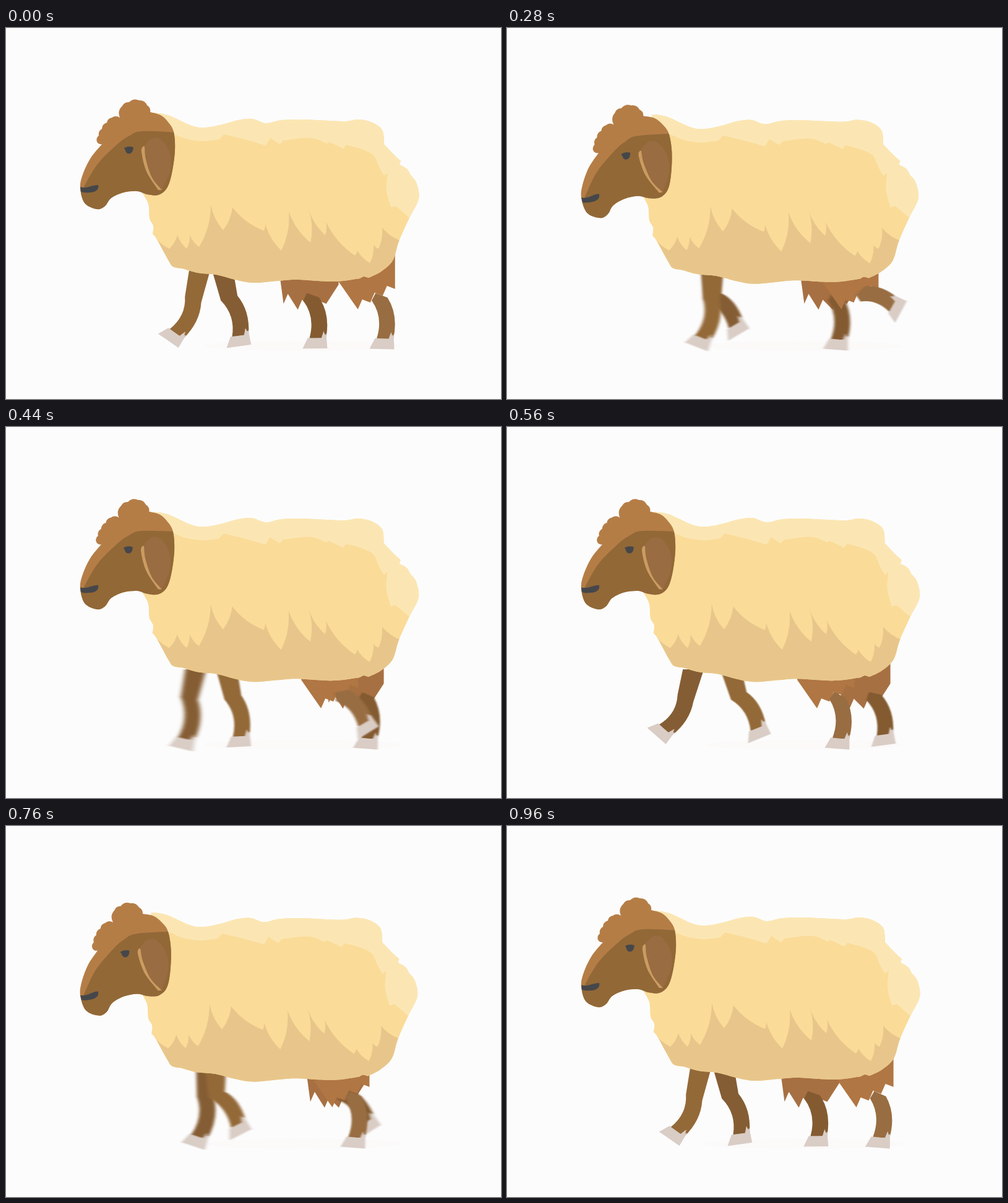
An HTML page that plays this animation: 800x600 px, repeating every 1000 ms.

```html
<!DOCTYPE html>
<html lang="en">
<head>
<meta charset="utf-8">
<title>Walking sheep</title>
<style>
  html, body { margin: 0; width: 100%; height: 100%; overflow: hidden; background: #fcfcfc; }
  svg { display: block; width: 100vw; height: 100vh; }
</style>
</head>
<body>
<svg viewBox="0 0 800 600">
  <defs id="defs">
    <path id="wool"/>
    <path id="skull"/>
    <clipPath id="inWool"><use href="#wool"/></clipPath>
    <clipPath id="inSkull"><use href="#skull"/></clipPath>
  </defs>
  <ellipse cx="480" cy="514" rx="160" ry="8" fill="#fcf9f9"/>
  <g id="legs"></g>
  <g id="body">
    <use href="#wool" fill="#fadb98"/>
    <g clip-path="url(#inWool)">
      <path id="shine" fill="#fbe6b3"/>
      <path id="shade" fill="#e8c68b"/>
    </g>
  </g>
  <g id="head">
    <use href="#skull" fill="#b57d46"/>
    <path id="face" clip-path="url(#inSkull)" fill="#926837"/>
    <path id="ear" fill="#996c41"/>
    <path id="rim" fill="#cb9c62"/>
    <path fill="#46474a" d="M191 194Q198 190 206 193L205 198C203 205 194 205 193 198Z"/>
    <path fill="#46474a" d="M120 257C130 261 140 253 149 254C151 262 143 266 135 266Q122 267 121 264Z"/>
  </g>
</svg>
<script>
const LOOP = 1000, STEP = 40, LAST = 23;
const $ = id => document.getElementById(id);
const fmt = p => p.map(v => v.toFixed(2)).join(' ');
const parse = text => text.trim().split(/\s+/).map(p => p.split(',').map(Number));
const poly = pts => 'M' + pts.map(fmt).join('L') + 'Z';
const unit = (x, y) => { const m = Math.hypot(x, y) || 1; return [x / m, y / m]; };

// Smooth line through points; a bar after a point makes it a corner
function smooth(text) {
  let d = '', corner;
  for (const piece of text.split('|')) {
    const pts = parse(piece);
    if (corner) pts.unshift(corner);
    else d = 'L' + fmt(pts[0]);
    for (let i = 0; i < pts.length - 1; i++) {
      const b = pts[i], c = pts[i + 1], a = pts[i - 1] || b, e = pts[i + 2] || c;
      const out = b.map((v, j) => v + (c[j] - a[j]) / 6);
      const into = c.map((v, j) => v - (e[j] - b[j]) / 6);
      d += `C${fmt(out)} ${fmt(into)} ${fmt(c)}`;
    }
    corner = pts[pts.length - 1];
  }
  return d;
}

// Corners joined by arcs that all bend to the same side
function bow(text, bend) {
  const pts = parse(text);
  return 'L' + fmt(pts[0]) + pts.slice(1).map(([x, y], i) => {
    const [px, py] = pts[i];
    const mid = [(x + px) / 2 - bend * (y - py), (y + py) / 2 + bend * (x - px)];
    return `Q${fmt(mid)} ${fmt([x, y])}`;
  }).join('');
}

function shape(id, ...parts) {
  $(id).setAttribute('d', 'M' + parts.join('').slice(1) + 'Z');
}

shape('wool', smooth(`238,137 262,141 300,158 322,161 350,156 375,149 398,147 420,154 445,149
  480,148 545,151 568,148 590,152 608,165 611,188 | 628,206 638,215 | 636,221 | 648,228 654,238 |
  663,250 667,276 652,307 635,345 625,376 606,394 586,404 | 578,402 572,405 | 530,410 470,407
  440,409 400,412 370,407 340,399 310,396 285,389 | 270,386 262,375 244,342 237,333 |
  238,320 232,308 230,285 220,266`));
shape('shine', smooth(`652,307 630,288 | 622,290 | 615,262 617,234 | 611,239 | 603,225 594,206
  575,196 550,189 | 545,195 | 522,184 | 518,187 | 500,179 480,178 448,182 | 443,188 | 427,178 |
  420,190 | 385,180 352,172 | 345,180 | 318,183 290,179 265,169 230,160`),
  'L230 120L690 120L690 330');
shape('shade', bow(`230,328 237,333 264,357 277,335 292,357 297,335 312,354 331,286 351,327
  366,290 417,328 419,316 445,360 457,297 492,347 489,293 516,335 517,313 564,368 568,360
  588,380 594,351 602,357 608,323 640,345`, 0.14), 'L640 430L230 430');
shape('skull', bow(`155,188 147,184 150,174 155,163 163,153 171,145 184,145 188,126 199,120
  215,117 228,125 233,136`, -0.35), smooth(`233,136 250,141 262,152 271,168 273,198 268,235
  260,259 246,270 228,269 212,264 190,266 170,275 160,288 147,293 127,283 120,258 124,237
  137,210 155,188`));
shape('face', smooth('124,260 148,220 180,188 200,174 220,167 280,169'),
  'L290 300L110 300L110 262');
shape('ear', smooth('222,192 235,179 250,180 264,200 266,228 252,262 | 235,240 222,192'));
shape('rim', smooth('222,191 219,200 227,232 246,262 | 252,262 | 236,242 226,212 224,192'));

// Fur above a hind leg: four spikes along the lower edge
function fringe(left, right, first, gap, tip) {
  const pts = [[left, -78], [left, -28]];
  for (let i = 0; i < 4; i++) {
    const x = first + gap * i;
    pts.push([x, tip(i)]);
    if (i < 3) pts.push([x + 7, tip(i) - 16]);
  }
  return [...pts, [right, -22], [right, -78]];
}

// Every limb follows one cycle: hip and knee sway, the shank leans and kicks forward
const fore = { hipSway: 25, kneeSway: 37, period: LAST, tilt: 7, sweep: 25, kick: 42 };
const hind = { tilt: -5, sweep: 0 };
const limbs = [
  { ...fore, hip: 326, knee: 325, start: 12.5, skin: '#855d34' },
  { ...fore, hip: 337, knee: 338, start: 1, skin: '#946938' },
  { ...hind, hip: 532, hipSway: 42, knee: 542, kneeSway: 51, start: 1, period: LAST, kick: 37,
    skin: '#845b31', fur: '#a77042',
    tuft: fringe(-48, 46, -43, 23, i => 9 + 11 * Math.sin(Math.PI * i / 3)) },
  // This stride is longer than the loop and skips at the seam
  { ...hind, hip: 566, hipSway: 34, knee: 569, kneeSway: 35, start: 12.75, period: 24.5, kick: 66,
    skin: '#986d42', fur: '#b07643',
    tuft: fringe(-63, 29, -31, 20, i => 18 - 11 * i) }
];
const hoofShape = parse('-16,3 -25,20 15,21 14,-3 12,-1 10,-7 6,4');

function add(parent, tag, attrs) {
  const el = document.createElementNS('http://www.w3.org/2000/svg', tag);
  for (const k in attrs) el.setAttribute(k, attrs[k]);
  return parent.appendChild(el);
}
limbs.forEach((l, i) => {
  const filter = add($('defs'), 'filter',
    { id: 'blur' + i, x: '-40%', width: '180%', 'color-interpolation-filters': 'sRGB' });
  l.blur = add(filter, 'feGaussianBlur', { stdDeviation: 0 });
  if (l.tuft) l.tuftEl = add($('legs'), 'path', { fill: l.fur });
  const group = add($('legs'), 'g', { filter: `url(#blur${i})` });
  l.legEl = add(group, 'path', { fill: l.skin });
  l.hoofEl = add(group, 'path', { fill: '#d9cdc6' });
});

function pose(l, n) {
  const turn = 2 * Math.PI * (n - l.start) / l.period, sway = Math.cos(turn);
  const lift = Math.max(0, Math.cos(turn - 4.55)) ** 0.9;
  const lean = l.tilt + l.sweep * sway - l.kick * lift;
  const r = lean * Math.PI / 180, length = 63 - 0.2 * Math.abs(lean);
  const kx = l.knee - l.kneeSway * sway, ky = 439 + 0.13 * Math.min(0, lean);
  return {
    hx: l.hip - l.hipSway * sway, kx, ky,
    ax: kx - length * Math.sin(r), ay: ky + length * Math.cos(r),
    tilt: (lean + 8) * Math.PI / 180
  };
}

function drawLimb(l, n) {
  const { hx, kx, ky, ax, ay, tilt } = pose(l, n);
  const cos = Math.cos(tilt), sin = Math.sin(tilt);
  const foot = ([x, y]) => [ax + x * cos - y * sin, ay + x * sin + y * cos];
  const down = unit(ax - kx, ay - ky);
  const along = (x, y, s, t) => [x + down[1] * s + down[0] * t, y - down[0] * s + down[1] * t];

  const bulge = 0.24 * Math.hypot(ax - kx, ay - ky);
  const mx = (kx + ax) / 2, my = (ky + ay) / 2;
  const ctrlL = along(mx, my, bulge - 12.5, 0), ctrlR = along(mx, my, bulge + 12, 0);

  let kneeL = along(kx, ky, -13, 1), kneeR = along(kx, ky, 13, 0);
  let top = [along(kx, ky, -5, -10)];
  if (l.tuft) {
    l.tuftEl.setAttribute('d', poly(l.tuft.map(([x, y]) => [x + hx, y + 437])));
  } else {
    const up = unit(kx - hx, ky - 398), d = unit(up[0] + down[0], up[1] + down[1]);
    kneeL = [kx - 14 * d[1], ky + 14 * d[0]];
    kneeR = [kx + 14 * d[1], ky - 14 * d[0]];
    top = [[hx + 17, 392], [hx - 17, 392]];
  }
  l.legEl.setAttribute('d', `M${fmt(kneeL)}Q${fmt(ctrlL)} ${fmt(foot([-13.5, 4]))}`
    + `L${fmt(foot([13.5, 4]))}Q${fmt(ctrlR)} ${fmt(kneeR)}L${top.map(fmt).join('L')}Z`);
  l.hoofEl.setAttribute('d', poly(hoofShape.map(foot)));

  // Fast feet smear sideways; the resting pose is sharp
  const speed = Math.abs(pose(l, n + 0.5).ax - pose(l, n - 0.5).ax);
  const smear = 0.17 * speed * Math.min(1, n, LAST - n);
  l.blur.setAttribute('stdDeviation', `${smear.toFixed(2)} ${(smear / 8).toFixed(2)}`);
}

function draw(ms) {
  // The first pose is held for two steps
  const n = Math.max(0, Math.floor((ms % LOOP) / STEP) - 1);
  for (const l of limbs) drawLimb(l, n);
  const nod = Math.abs(Math.sin(2 * Math.PI * n / LAST)) ** 2.2;
  $('body').setAttribute('transform',
    `translate(${-1.5 * nod} ${0.3 * nod}) rotate(${-0.4 * nod} 600 390)`);
  $('head').setAttribute('transform', `translate(${-nod} 0) rotate(${-5.8 * nod} 290 255)`);
}

const start = performance.now();
function tick() {
  draw(performance.now() - start);
  requestAnimationFrame(tick);
}
draw(0);
requestAnimationFrame(tick);
</script>
</body>
</html>
```
